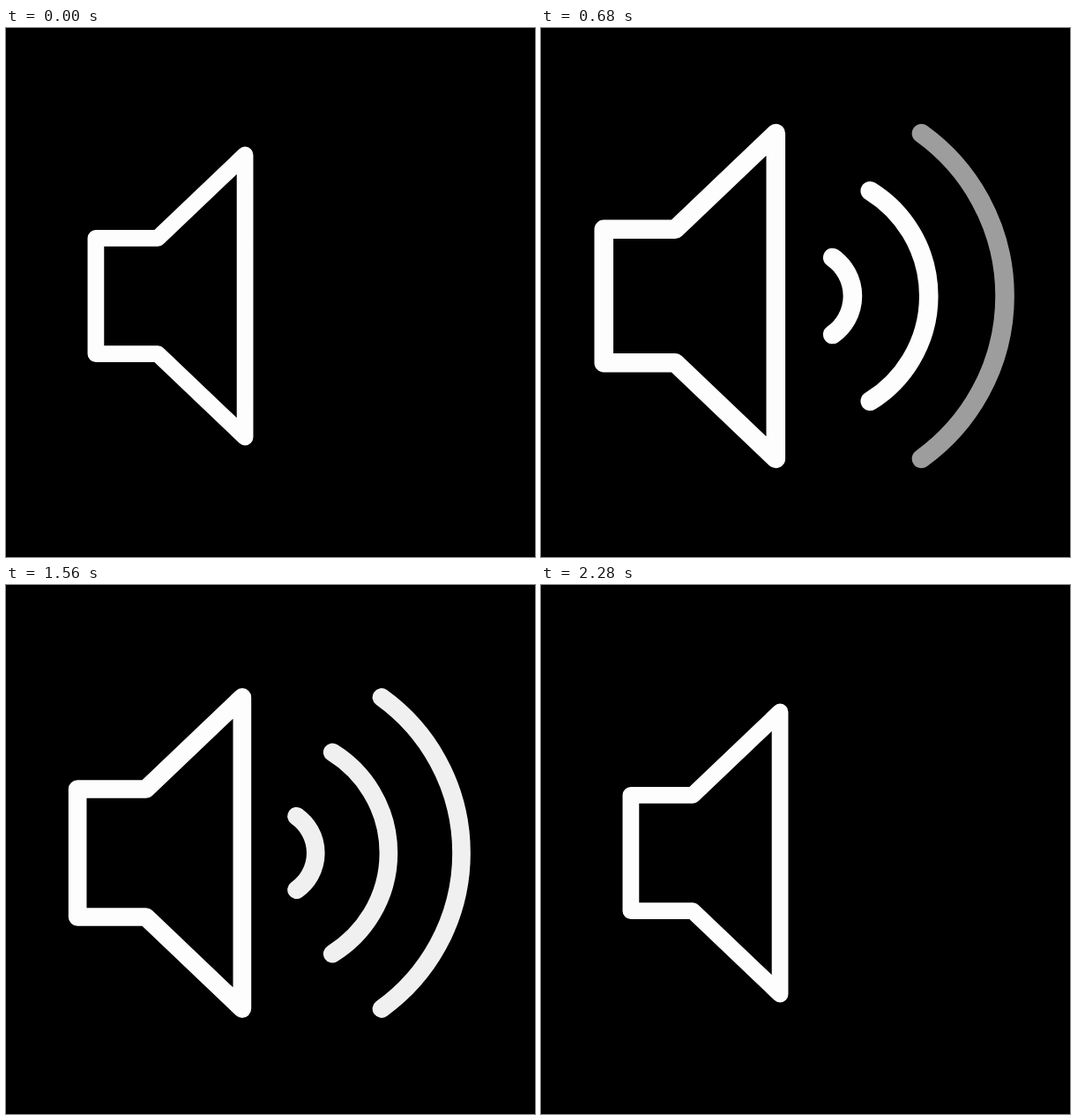
Animation of 600 by 600 pixels, one loop 2400 ms. Source, as an HTML page:

```html
<!DOCTYPE html>
<html lang="en">
<head>
<meta charset="utf-8">
<title>Volume icon</title>
<style>
  html, body { margin: 0; width: 100%; height: 100%; overflow: hidden; background: #000; }
  svg { display: block; width: 100%; height: 100%; }
  path { fill: none; stroke: #fdfdfd; stroke-width: 20.8; stroke-linecap: round; stroke-linejoin: round; }
</style>
</head>
<body>
<svg viewBox="0 0 600 600">
  <g id="icon">
    <path d="M79.6 231H157.7L267.6 126.2V481.8L157.7 377H79.6Z"/>
    <path class="wave" d="M329.7 262A51.2 51.2 0 0 1 329.7 346"/>
    <path class="wave" d="M370.7 189A135.2 135.2 0 0 1 370.7 419"/>
    <path class="wave" d="M426.8 126.2A218.9 218.9 0 0 1 426.8 481.8"/>
  </g>
</svg>
<script>
  const LOOP = 2400, STEP = 40;
  const CX = 302.5, CY = 304;
  const icon = document.getElementById('icon');
  const waves = document.querySelectorAll('.wave');

  // start, end, from, to, easing handles x1 and x2 (y1 = 0, y2 = 1)
  const scales = [
    [40, 710, 0.9, 1.038, 0.57, 0.62],
    [710, 960, 1.038, 1, 0.42, 0.58],
    [1360, 2280, 1, 0.9, 0.48, 0.78]
  ];
  const fadeIn = { starts: [155, 358, 562], length: 190 };
  const fadeOut = { start: 1548, length: 242 };

  const clamp = v => Math.min(1, Math.max(0, v));

  function ease(x, x1, x2) {
    let lo = 0, hi = 1;
    for (let i = 0; i < 24; i++) {
      const u = (lo + hi) / 2, v = 1 - u;
      if (3 * v * v * u * x1 + 3 * v * u * u * x2 + u * u * u < x) lo = u;
      else hi = u;
    }
    return lo * lo * (3 - 2 * lo);
  }

  function scaleAt(t) {
    let value = scales[0][2];
    for (const [start, end, from, to, x1, x2] of scales) {
      if (t >= start) {
        value = from + (to - from) * ease(clamp((t - start) / (end - start)), x1, x2);
      }
    }
    return value;
  }

  function draw(t) {
    icon.setAttribute('transform',
      `translate(${CX} ${CY}) scale(${scaleAt(t)}) translate(${-CX} ${-CY})`);
    const out = 1 - clamp((t - fadeOut.start) / fadeOut.length);
    waves.forEach((wave, i) => {
      wave.style.opacity = clamp((t - fadeIn.starts[i]) / fadeIn.length) * out;
    });
  }

  const begin = performance.now();
  function tick() {
    const t = (performance.now() - begin) % LOOP;
    draw(Math.floor(t / STEP) * STEP);
    requestAnimationFrame(tick);
  }
  tick();
</script>
</body>
</html>
```
